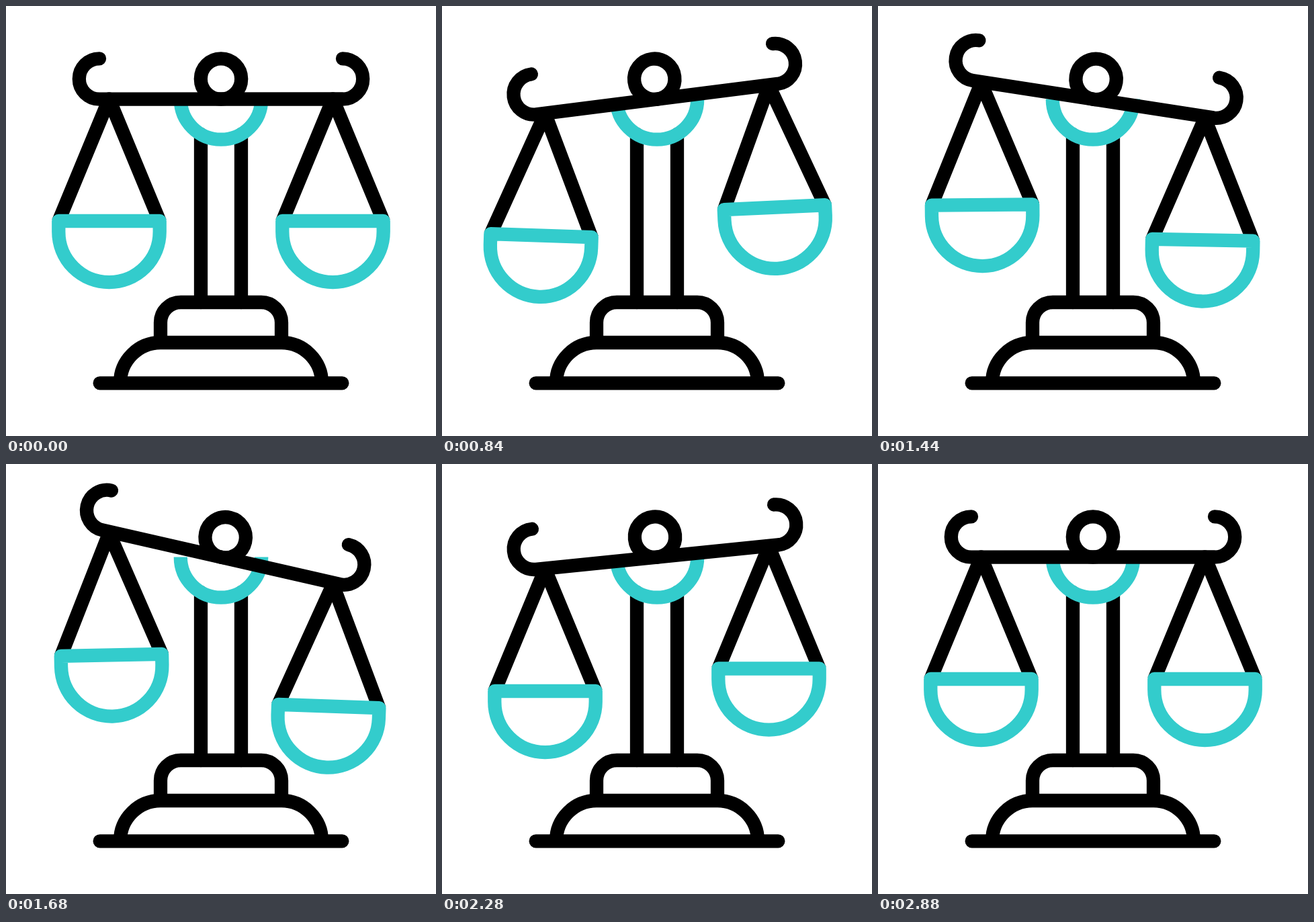
An HTML page with a canvas for the animation above (3000 ms loop, 640x640 px).

```html
<!DOCTYPE html>
<html>
<head>
<meta charset="utf-8">
<title>Balance scales</title>
<style>
  html, body { margin: 0; width: 100%; height: 100%; overflow: hidden; background: #fff; }
  canvas { display: block; width: 640px; height: 640px; }
</style>
</head>
<body>
<canvas id="stage" width="640" height="640"></canvas>
<script>
const ctx = document.getElementById('stage').getContext('2d');
const BLACK = '#000', TEAL = '#33cccc';
const LOOP = 3000, STEP = 40, STROKE = 20.3;
const CX = 320, BEAM_Y = 138.5;

// Every moving part shares these key times, eased in and out between them.
const KEY_TIMES = [240, 722, 1728, 2280, 2880];
const BEAM_TILT = [0, -8, 13, -5.75, 0];
const PANS = [
  { x: 153.5, drop: [0, 24, -36, 18, 0], swing: [0, 2, -1.1, 0, 0] },
  { x: 486.5, drop: [0, -22.5, 41, -15.5, 0], swing: [0, -2.83, 2, 0, 0] }
];

function valueAt(values, t) {
  const last = KEY_TIMES.length - 1;
  if (t <= KEY_TIMES[0]) return values[0];
  if (t >= KEY_TIMES[last]) return values[last];
  const i = KEY_TIMES.findIndex(k => k > t) - 1;
  const u = (t - KEY_TIMES[i]) / (KEY_TIMES[i + 1] - KEY_TIMES[i]);
  return values[i] + (values[i + 1] - values[i]) * u * u * (3 - 2 * u);
}

function stroke(color, cap, trace) {
  ctx.beginPath();
  trace();
  ctx.strokeStyle = color;
  ctx.lineCap = cap;
  ctx.stroke();
}

function line(...points) {
  ctx.moveTo(points[0], points[1]);
  for (let i = 2; i < points.length; i += 2) ctx.lineTo(points[i], points[i + 1]);
}

function rotated(x, y, degrees, draw) {
  ctx.save();
  ctx.translate(x, y);
  ctx.rotate(degrees * Math.PI / 180);
  draw();
  ctx.restore();
}

// A plinth tier: two vertical sides joined to a flat top by quarter circles.
function tier(left, right, top, bottom, r) {
  ctx.moveTo(left, bottom);
  ctx.lineTo(left, top + r);
  ctx.arc(left + r, top + r, r, Math.PI, 1.5 * Math.PI);
  ctx.arc(right - r, top + r, r, -Math.PI / 2, 0);
  ctx.lineTo(right, bottom);
}

function drawStand() {
  for (const x of [290, 350]) stroke(BLACK, 'round', () => line(x, 191, x, 441));
  stroke(BLACK, 'butt', () => tier(230, 410, 441, 501, 30));
  stroke(BLACK, 'butt', () => tier(170, 470, 501, 561.3, 60));
  stroke(BLACK, 'round', () => line(139.7, 561.3, 500.3, 561.3));
  stroke(TEAL, 'butt', () => ctx.arc(CX, BEAM_Y, 60.2, 0, Math.PI));
}

function drawBeam() {
  stroke(BLACK, 'round', () => {
    ctx.arc(-181, -30, 30.2, -Math.PI / 2, Math.PI / 2, true);
    ctx.lineTo(181, 0);
    ctx.arc(181, -30, 30.2, Math.PI / 2, -Math.PI / 2, true);
  });
  stroke(BLACK, 'butt', () => ctx.arc(0, -30, 30.2, 0, 2 * Math.PI));
}

function drawPan() {
  stroke(BLACK, 'butt', () => line(-75.7, 183, 0, 0, 75.7, 183));
  stroke(TEAL, 'butt', () => {
    line(-75.2, 181.5, 75.2, 181.5);
    ctx.arc(0, 197.5, 75.2, 0, Math.PI);
    ctx.closePath();
  });
}

function render(t) {
  ctx.fillStyle = '#fff';
  ctx.fillRect(0, 0, 640, 640);
  ctx.lineWidth = STROKE;
  ctx.lineJoin = 'round';
  drawStand();
  rotated(CX, BEAM_Y, valueAt(BEAM_TILT, t), drawBeam);
  for (const pan of PANS) {
    rotated(pan.x, BEAM_Y + valueAt(pan.drop, t), valueAt(pan.swing, t), drawPan);
  }
}

const start = performance.now();
function tick() {
  const t = (performance.now() - start) % LOOP;
  render(Math.floor(t / STEP) * STEP);
  requestAnimationFrame(tick);
}
tick();
</script>
</body>
</html>
```
